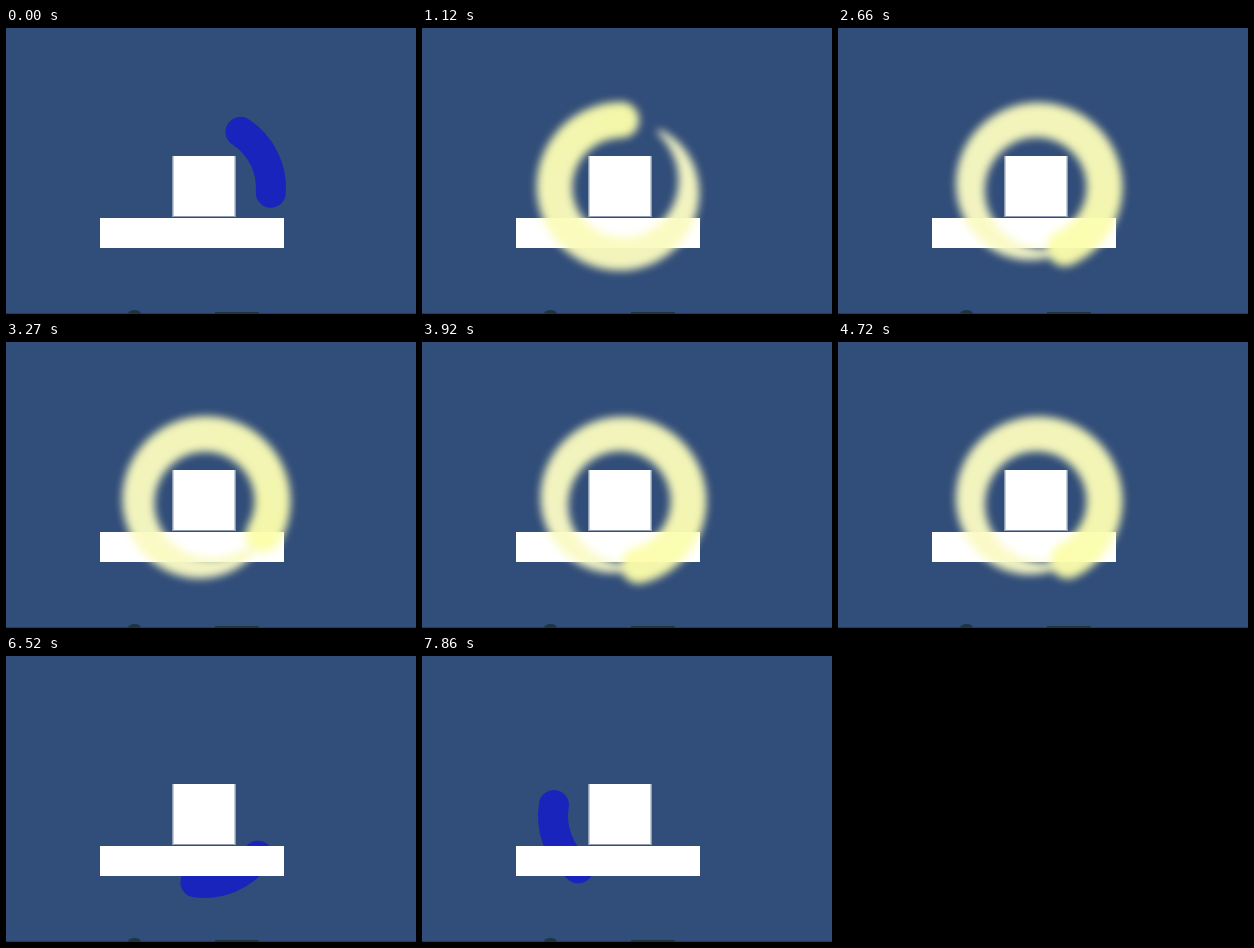
Recreate the animation shown at these times as an HTML page with a canvas. Size 410 px wide and 286 px high, loop 7940 ms.

```html
<!DOCTYPE html>
<html lang="en">
<head>
<meta charset="utf-8">
<title>Orbiting arc</title>
<style>
html, body { margin: 0; width: 100%; height: 100%; overflow: hidden; background: #314d79; }
canvas { display: block; }
</style>
</head>
<body>
<canvas id="stage" width="410" height="286"></canvas>
<script>
const ctx = document.getElementById('stage').getContext('2d');
const LOOP = 7940;
const SPAN = 61;
const GLOW_START = 620, GLOW_END = 5780;

// Leading angle of the arc in degrees: [time, angle, steps taken to get there]
const SPIN = [
  [550, 4, 1], [1890, 635, 19], [2660, 1146, 11], [3920, 1875, 18],
  [4720, 2223, 12], [5560, 2650, 12], [5780, 2758, 3]
];
const SWING = [
  [6170, 4, 1], [6590, 116, 6], [6660, 116, 1], [6940, 134, 4],
  [7007, 134, 1], [7590, 152.5, 8], [7860, 189.5, 1]
];

const rad = deg => deg * Math.PI / 180;

function angleAt(keys, t) {
  if (t <= keys[0][0]) return keys[0][1];
  for (let i = 1; i < keys.length; i++) {
    const [t0, a0] = keys[i - 1];
    const [t1, a1, steps] = keys[i];
    if (t < t1) {
      const p = Math.floor((t - t0) / (t1 - t0) * steps + 1e-6) / steps;
      return a0 + (a1 - a0) * p;
    }
  }
  return keys[keys.length - 1][1];
}

function box(color, x, y, w, h) {
  ctx.fillStyle = color;
  ctx.fillRect(x, y, w, h);
}

function drawBackground() {
  box('#314d79', 0, 0, 410, 286);
  box('#273c5b', 0, 285, 410, 1);
  box('#20343f', 209, 284, 44, 2);
  ctx.fillStyle = '#20343f';
  ctx.beginPath();
  ctx.ellipse(128.5, 286, 6.5, 4, 0, 0, 7);
  ctx.fill();
}

function drawBlocks() {
  box('#fff', 94, 190, 184, 30);
  box('#8d9cb5', 166, 128, 64, 61);
  box('#fff', 167.5, 128, 61, 60);
}

function drawArc(head) {
  ctx.strokeStyle = '#1924bc';
  ctx.lineWidth = 30;
  ctx.lineCap = 'round';
  ctx.beginPath();
  ctx.arc(198, 160, 67, rad(head - SPAN), rad(head));
  ctx.stroke();
}

// Tapered band that follows the head around the ring
function tracePath(head, length, width) {
  const cx = 199.5, cy = 159, r = 67, n = 90;
  const edge = (i, side) => {
    const f = i / n;
    const a = rad(head - length * f);
    const half = width / 2 * (1 - 0.9 * f ** 4);
    ctx.lineTo(cx + (r + side * half) * Math.cos(a), cy + (r + side * half) * Math.sin(a));
  };
  ctx.beginPath();
  for (let i = n; i >= 0; i--) edge(i, 1);
  const a = rad(head);
  ctx.arc(cx + r * Math.cos(a), cy + r * Math.sin(a), width / 2, a, a + Math.PI);
  for (let i = 0; i <= n; i++) edge(i, -1);
  ctx.closePath();
}

function drawGlow(head) {
  const length = Math.min(360, head + SPAN - 4);
  const g = ctx.createConicGradient(rad(head + 14), 199.5, 159);
  g.addColorStop(0, '#fafac8');
  g.addColorStop(0.7, '#fbfcb9');
  g.addColorStop(1, '#fcfea8');
  ctx.save();
  ctx.filter = 'blur(4px)';
  ctx.globalAlpha = 0.96;
  ctx.fillStyle = g;
  tracePath(head, length, 36);
  ctx.fill();
  ctx.restore();
}

function draw(t) {
  const glowing = t >= GLOW_START && t < GLOW_END;
  drawBackground();
  if (!glowing) drawArc(angleAt(SWING, t));
  drawBlocks();
  if (glowing) drawGlow(angleAt(SPIN, t));
}

const start = performance.now();
function tick() {
  draw((performance.now() - start) % LOOP);
  requestAnimationFrame(tick);
}
tick();
</script>
</body>
</html>
```
